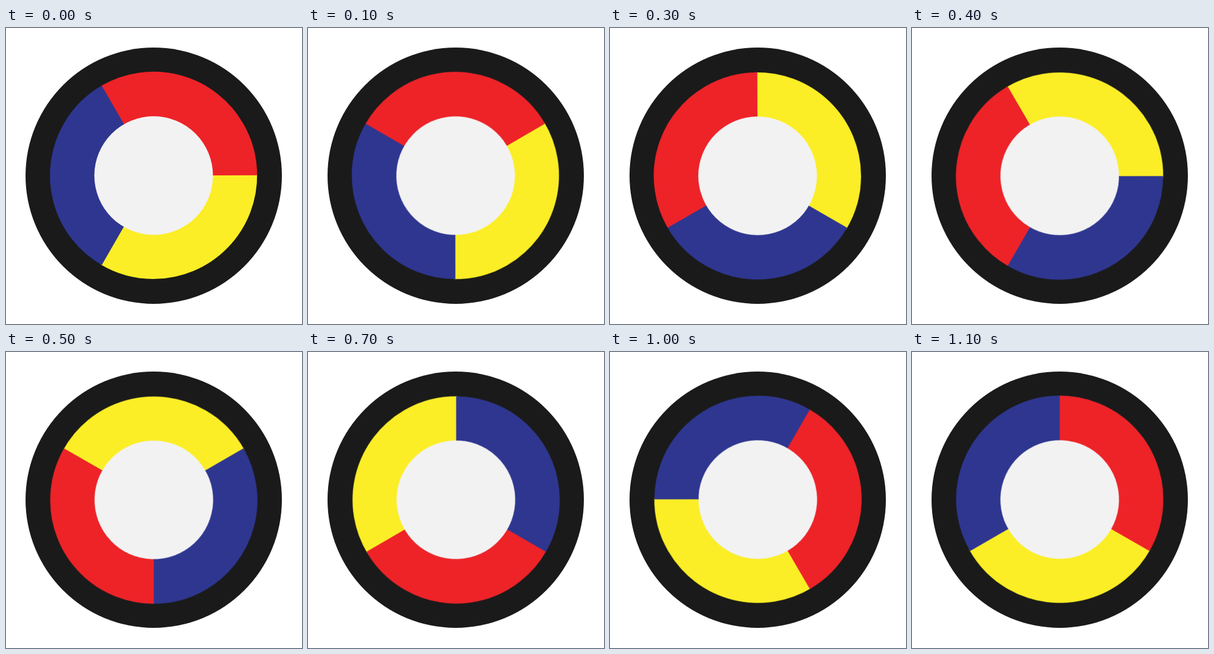
Animation of 500 by 500 pixels, one loop 1200 ms. Source, as an HTML page:

```html
<!DOCTYPE html>
<html lang="en">
<head>
<meta charset="utf-8">
<title>Spinning colour wheel</title>
<style>
  html, body { margin: 0; width: 100%; height: 100%; overflow: hidden; background: #fff; }
  svg { display: block; width: 100%; height: 100%; }
  .wheel {
    transform-origin: 249.6px 249.5px;
    animation: spin 1.2s steps(12) infinite;
  }
  .band { fill: none; stroke-width: 85; }
  @keyframes spin { to { transform: rotate(-360deg); } }
</style>
</head>
<body>
<svg viewBox="0 0 500 500">
  <circle cx="249.5" cy="249.5" r="216.5" fill="#1a1a1a"/>
  <!-- the wheel sits slightly off its axis, so it wobbles as it turns -->
  <g class="wheel">
    <g transform="translate(249.2 248.9)">
      <!-- each sector runs a degree under its neighbour to hide seams -->
      <circle class="band" r="132.5" pathLength="360" stroke="#fbee26" stroke-dasharray="122 238" transform="rotate(-1)"/>
      <circle class="band" r="132.5" pathLength="360" stroke="#2e3690" stroke-dasharray="121 239" transform="rotate(120)"/>
      <circle class="band" r="132.5" pathLength="360" stroke="#ed2328" stroke-dasharray="120 240" transform="rotate(240)"/>
    </g>
    <circle cx="249.4" cy="249.3" r="100.2" fill="#f2f2f2"/>
  </g>
</svg>
</body>
</html>
```
